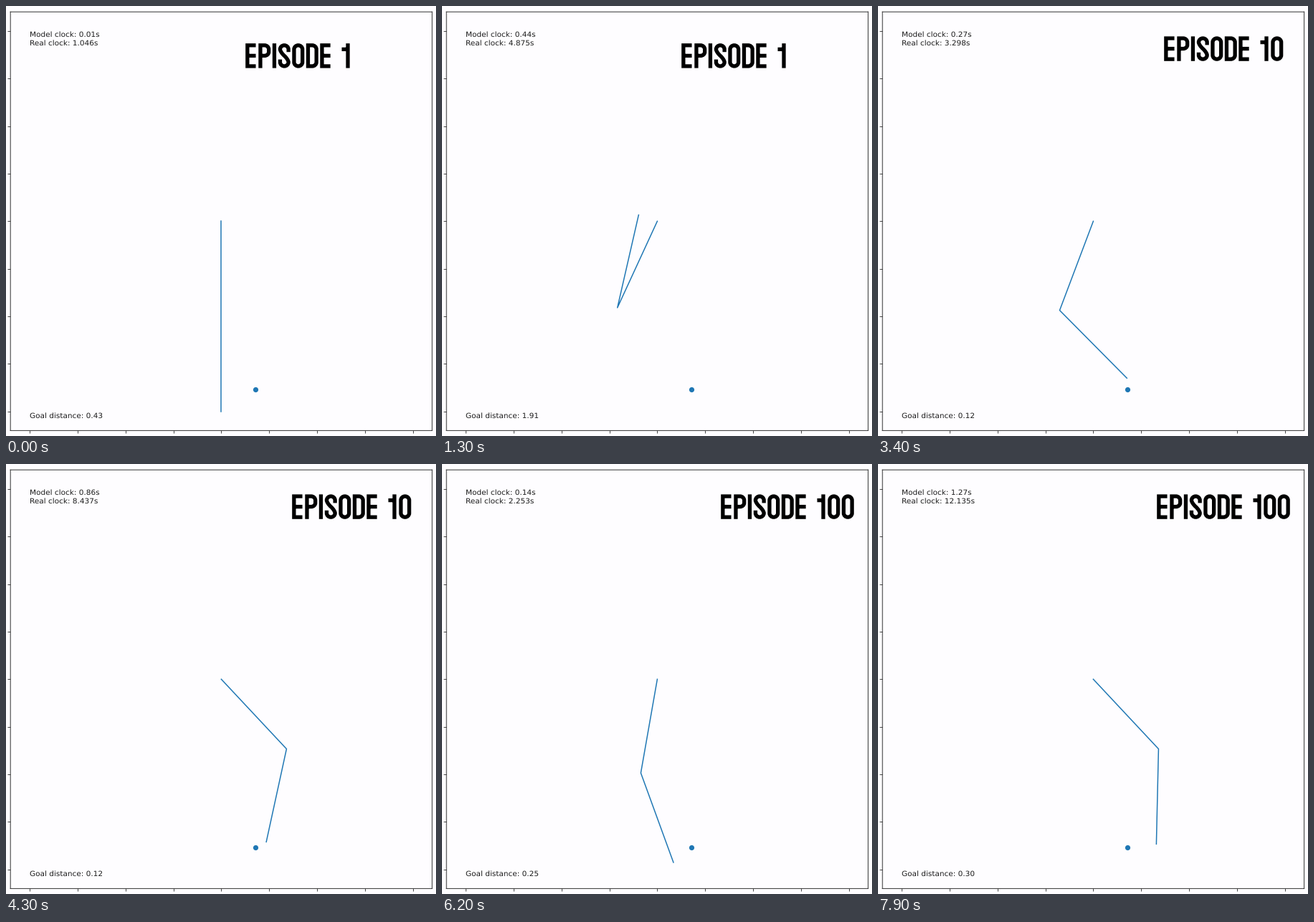
A matplotlib script that plays this animation: 600 by 600 pixels, repeating every 8 s.

```python
import matplotlib.pyplot as plt
import numpy as np
from matplotlib.animation import FuncAnimation
from matplotlib.patches import PathPatch
from matplotlib.path import Path

PX = 0.72  # points per pixel at 100 dpi
FRAMES, RUN = 80, 30
PAPER, INK, BLUE = "#fefdff", "#1c1c1c", "#1f77b4"
GOAL = np.array([0.358, -1.766])

# Title capitals are strokes on a small grid: column letter, then row digit.
# M moves, R rounds the corner at the next point, Z closes.
CAP, STROKE, WIDTH = 34.4, 5.3, 17
COLS = dict(o=0, l=STROKE / 2, c=WIDTH / 2, r=WIDTH - STROKE / 2)
UPPER = [0, STROKE / 2, 8.2, 12]
ROWS = UPPER + [CAP / 2] + [CAP - y for y in reversed(UPPER)]
RING = "M l2 R l1 c1 R r1 r2 r6 R r7 c7 R l7 l6 Z"
GLYPHS = {
    "E": "M r1 l1 l7 r7 M r4 l4",
    "P": "M l8 l1 c1 R r1 r2 r3 R r4 c4 l4",
    "I": "M l0 l8",
    "S": "M r3 r2 R r1 c1 R l1 l2 R l3 c4 R r5 r6 R r7 c7 R l7 l6 l5",
    "O": RING,
    "D": "M l1 c1 R r1 r2 r6 R r7 c7 l7 Z",
    "0": RING,
    "1": "M c8 c0 M o2 c2",
    " ": "",
}
ADVANCE = {"E": 18.1, "I": 8, "1": 14.8, " ": 12.1}


def text_path(text, x, y):
    verts, codes = [], []
    for ch in text:
        words = iter(GLYPHS[ch].split())
        point = lambda w: np.array([x + COLS[w[0]], y + ROWS[int(w[1])]])
        for word in words:
            if word == "Z":
                verts.append(verts[-1])
                codes.append(Path.CLOSEPOLY)
            elif word == "R":
                start, corner, end = verts[-1], point(next(words)), point(next(words))
                verts += [start + 0.55 * (corner - start),
                          end + 0.55 * (corner - end), end]
                codes += [Path.CURVE4] * 3
            elif word == "M":
                verts.append(point(next(words)))
                codes.append(Path.MOVETO)
            else:
                verts.append(point(word))
                codes.append(Path.LINETO)
        x += ADVANCE.get(ch, 19.5)
    return Path(verts, codes)


def smooth(t, xs, ys):
    """Cubic Hermite curve through the points, starting at rest."""
    slope = np.gradient(ys, xs)
    slope[0] = 0
    k = int(np.clip(np.searchsorted(xs, t, side="right") - 1, 0, len(xs) - 2))
    h = xs[k + 1] - xs[k]
    u = (t - xs[k]) / h
    return (ys[k] * (1 + 2 * u) * (1 - u) ** 2 + h * slope[k] * u * (1 - u) ** 2
            + ys[k + 1] * u * u * (3 - 2 * u) + h * slope[k + 1] * u * u * (u - 1))


class Episode:
    """Every run starts hanging straight down with the same clocks.

    Poses are (step, upper angle, lower angle), clocks (step, model, real).
    """

    def __init__(self, number, x, y, poses, clocks):
        self.title = text_path(f"EPISODE {number}", x, y)
        self.poses = np.array([(0, 0, 0), *poses], float).T
        steps, *clocks = np.array([(0, 0.01, 1.046), *clocks]).T
        self.clocks = [np.polyfit(steps, values, 2) for values in clocks]

    def joints(self, t):
        steps, *angles = self.poses
        angles = np.radians([smooth(t, steps, a) for a in angles])
        links = np.column_stack([np.sin(angles), -np.cos(angles)])
        return np.vstack([[0, 0], np.cumsum(links, axis=0)])

    def times(self, t):
        return [float(np.polyval(p, t)) for p in self.clocks]


EPISODES = [
    Episode(1, 334.2, 52.2,
            [(8, -29, 80), (13, -24.6, 167.2), (19, -28, 258),
             (25, -50.9, 360), (29, -58, 408)],
            [(13, 0.44, 4.875), (25, 0.87, 8.513)]),
    Episode(10, 399.2, 42.4,
            [(5, -22, 52), (10, 13, 32), (13, 42.9, -12.2),
             (18, 55, -62), (23, 27.3, -103.2), (29, -15, -102)],
            [(13, 0.86, 8.437), (23, 1.5, 14.263)]),
    Episode(100, 389.2, 42.4,
            [(2, -9.9, 19.9), (5, -20, 32), (12, -4, -38), (19, 42.9, -1.3)],
            [(2, 0.14, 2.253), (19, 1.27, 12.135)]),
]

plt.rcParams.update({"font.family": "DejaVu Sans", "text.hinting": "none"})
fig = plt.figure(figsize=(6, 6), dpi=100, facecolor=PAPER)

left, right, top, bottom = 6.2, 594.6, 8.2, 592.4
ax = fig.add_axes([left / 600, 1 - bottom / 600,
                   (right - left) / 600, (bottom - top) / 600], facecolor=PAPER)
marks = np.arange(-2, 2.1, 0.5)
ax.set(xlim=(-2.2, 2.2), ylim=(-2.2, 2.2), xticks=marks, yticks=marks)
ax.tick_params(length=3.6 * PX, width=0.9 * PX, color="#333333",
               labelbottom=False, labelleft=False)
for spine in ax.spines.values():
    spine.set(linewidth=PX, color="#333333", snap=False)
arm, = ax.plot([], [], color=BLUE, lw=1.5 * PX, solid_capstyle="projecting")
ax.plot(*GOAL, "o", color=BLUE, ms=7.2 * PX, mew=0)

# Overlay measured in pixels from the top left
page = fig.add_axes([0, 0, 1, 1])
page.set(xlim=(0, 600), ylim=(600, 0))
page.axis("off")
title = page.add_patch(PathPatch(EPISODES[0].title, fc="none", ec="black",
                                 lw=STROKE * PX, capstyle="butt",
                                 joinstyle="miter", snap=False))
model_text, real_text, goal_text = (
    page.text(32.6, y, "", size=10.45 * PX, color=INK, va="baseline")
    for y in (43.2, 55.2, 574.4))


def draw(i):
    episode, t = EPISODES[i // RUN], i % RUN
    joints = episode.joints(t)
    model, real = episode.times(t)
    arm.set_data(*joints.T)
    title.set_path(episode.title)
    model_text.set_text(f"Model clock: {round(model, 2)}s")
    real_text.set_text(f"Real clock: {round(real, 3)}s")
    goal_text.set_text(f"Goal distance: {np.hypot(*(joints[-1] - GOAL)):.2f}")
    return arm, title, model_text, real_text, goal_text


anim = FuncAnimation(fig, draw, frames=FRAMES, interval=100, repeat=True,
                     repeat_delay=0, blit=False)
plt.show()
```
